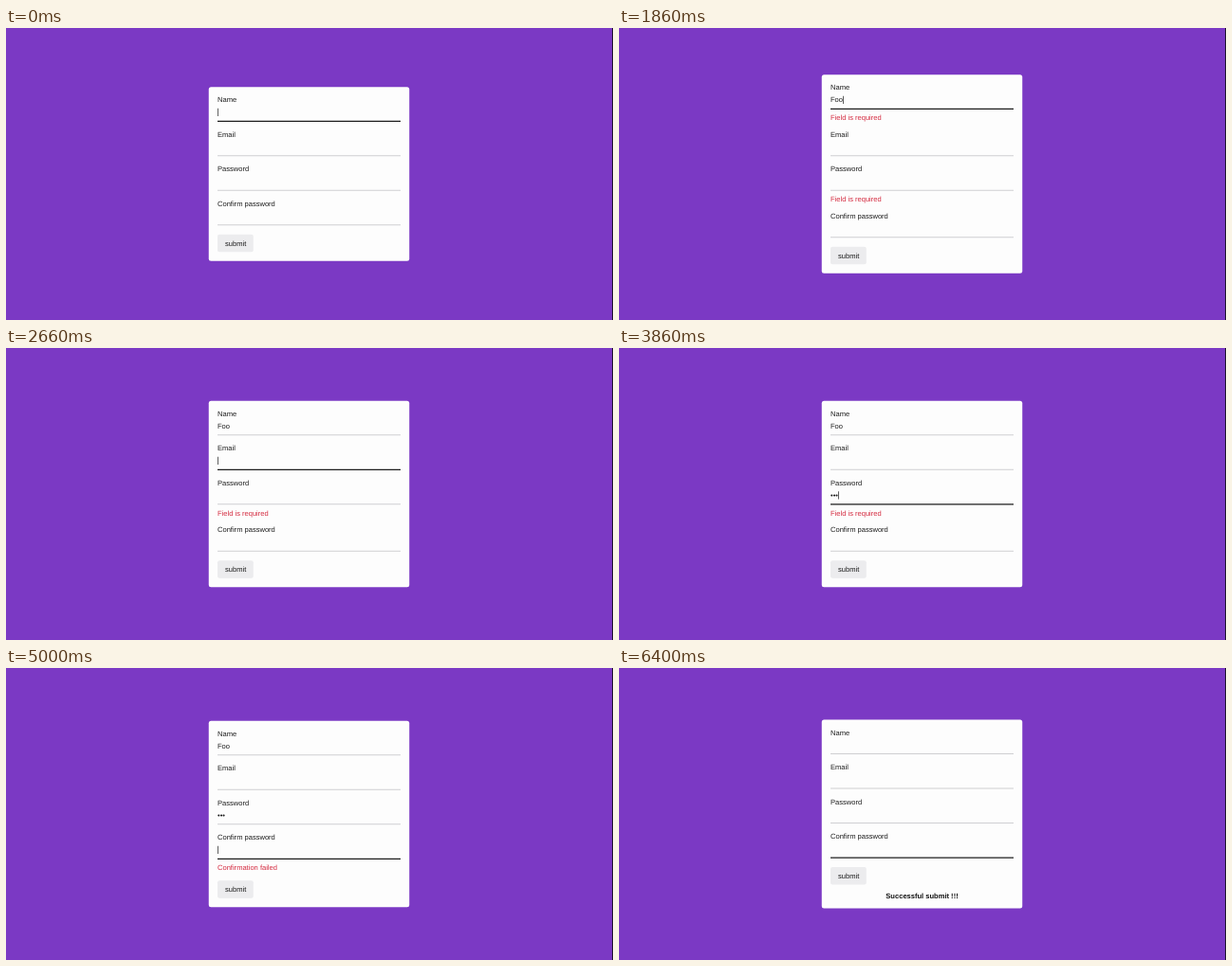
Recreate the animation shown at these times as an HTML page with a canvas. Size 640 by 308 pixels, loop 6460 ms.

```html
<!DOCTYPE html>
<html lang="en">
<head>
<meta charset="utf-8">
<title>Form validation</title>
<style>
  html, body { margin: 0; height: 100%; overflow: hidden; background: #7b39c4; }
  canvas { display: block; }
</style>
</head>
<body>
<canvas id="stage" width="640" height="308"></canvas>
<script>
const ctx = document.getElementById('stage').getContext('2d');
const LOOP = 6460, BLINK = 530;
const LABELS = ['Name', 'Email', 'Password', 'Confirm password'];
const REQUIRED = 'Field is required', MISMATCH = 'Confirmation failed';
const FONT = '7.55px "Liberation Sans", Arial, sans-serif';
const LEFT = 223, WIDTH = 193;
const INK = '#1c1c1c', RED = '#d42a3f';

// Each step changes part of the form state and restarts the caret blink unless it is a late validation.
const steps = [
  [0, { focus: 0, values: ['', '', '', ''], errors: [], done: false }],
  [530, { errors: [REQUIRED, , REQUIRED] }, true],
  [1330, { values: ['F', '', '', ''] }],
  [1730, { values: ['Fo', '', '', ''] }],
  [1860, { values: ['Foo', '', '', ''] }],
  [2060, { errors: [, , REQUIRED] }, true],
  [2530, { focus: 1 }],
  [3060, { focus: 2 }],
  [3600, { values: ['Foo', '', '•', ''] }],
  [3660, { values: ['Foo', '', '••', ''] }],
  [3800, { values: ['Foo', '', '•••', ''] }],
  [4200, { errors: [, , , MISMATCH] }, true],
  [5000, { focus: 3 }],
  [5060, { values: ['Foo', '', '•••', '•'] }],
  [5130, { values: ['Foo', '', '•••', '••'] }],
  [5200, { values: ['Foo', '', '•••', '•••'] }],
  [5400, { errors: [] }],
  [5800, { values: ['', '', '', ''], done: true }],
];

function stateAt(t) {
  const state = { since: 0 };
  for (const [time, change, keepBlink] of steps) {
    if (time > t) break;
    Object.assign(state, change);
    if (!keepBlink) state.since = time;
  }
  return state;
}

function box(x, y, w, h, color, radius = 0) {
  ctx.fillStyle = color;
  ctx.beginPath();
  ctx.roundRect(x, y, w, h, radius);
  ctx.fill();
}

function text(str, x, y, color = INK) {
  ctx.fillStyle = color;
  ctx.fillText(str, x, y);
}

function draw(t) {
  const { focus, values, errors, done, since } = stateAt(t);
  const caretOn = Math.floor((t - since) / BLINK) % 2 === 0;
  const errorCount = errors.filter(Boolean).length;
  const height = 183.5 + 13 * errorCount + (done ? 15.5 : 0);
  let y = 154 - height / 2;

  box(0, 0, 640, 308, '#7b39c4');
  box(639, 0, 1, 308, '#1b0d2b');
  box(213.75, y, 211.5, height, '#fdfdfd', 2.5);

  ctx.font = FONT;
  ctx.textRendering = 'geometricPrecision';
  ctx.textAlign = 'left';
  LABELS.forEach((label, i) => {
    const active = i === focus;
    text(label, LEFT, y + 16.2);
    text(values[i], LEFT, y + 29.2);
    if (active && caretOn) {
      box(LEFT + 0.2 + ctx.measureText(values[i]).width, y + 22.4, 0.7, 8.4, INK);
    }
    box(LEFT, y + 35.5, WIDTH, active ? 1.35 : 1, active ? INK : '#cfcfd2');
    if (errors[i]) {
      text(errors[i], LEFT, y + 48, RED);
      y += 13;
    }
    y += 36.5;
  });

  box(LEFT, y + 9.5, 37.8, 18.6, '#ececee', 2);
  text('submit', 231, y + 21.4);
  if (done) {
    ctx.font = 'bold ' + FONT;
    ctx.textAlign = 'center';
    text('Successful submit !!!', 319.5, y + 42.2, '#111');
  }
}

const start = performance.now();
function tick() {
  draw((performance.now() - start) % LOOP);
  requestAnimationFrame(tick);
}
tick();
</script>
</body>
</html>
```
